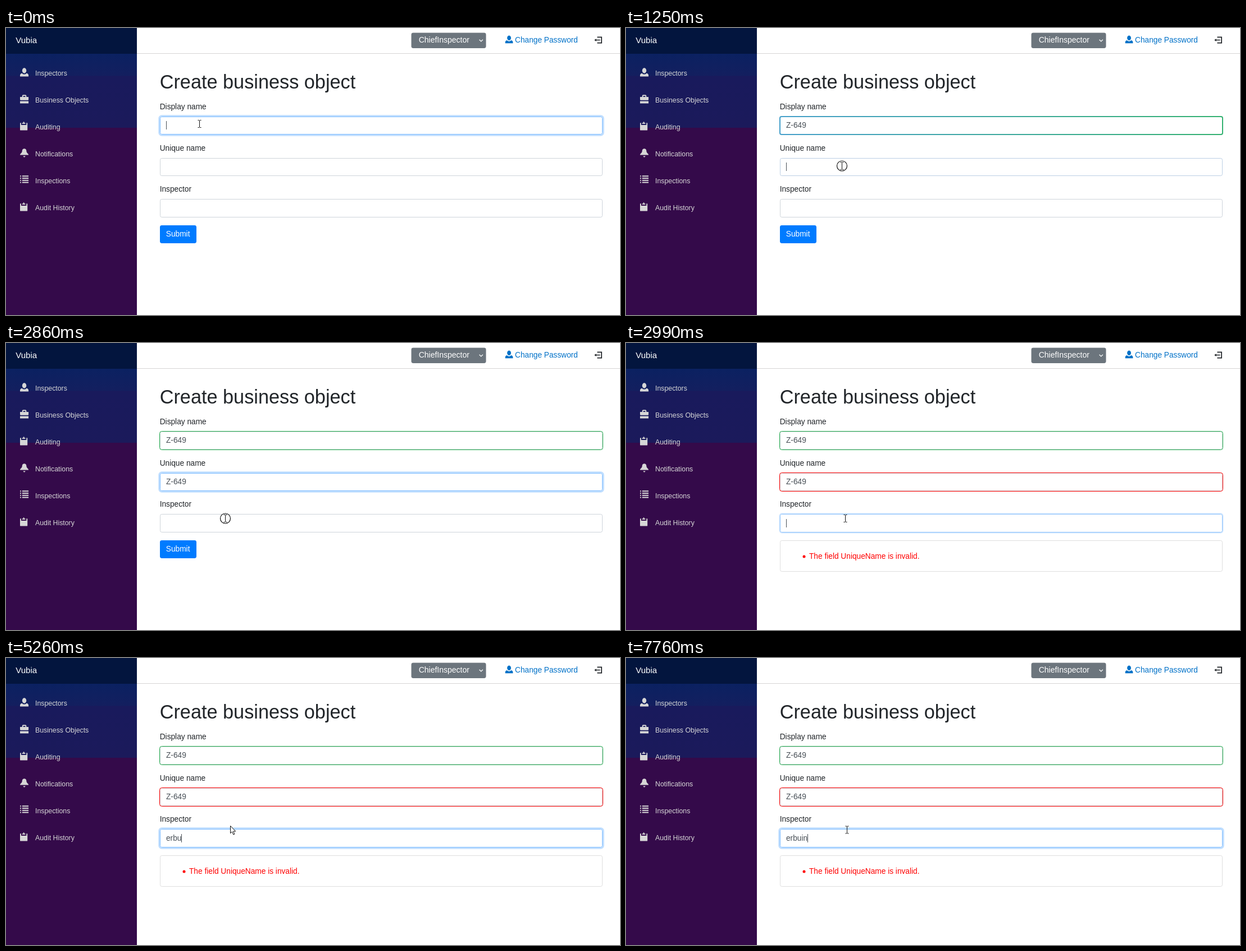
Recreate the animation shown at these times as an HTML page. Size 1093 px wide and 512 px high, loop 8 s.

```html
<!DOCTYPE html>
<html lang="en">
<head>
<meta charset="utf-8">
<title>Create business object</title>
<style>
html, body { margin: 0; width: 100%; height: 100%; overflow: hidden; background: #fff; }
#stage { position: relative; width: 1093px; height: 512px; overflow: hidden; }
#stage > * { position: absolute; }
.side {
  left: 0; top: 0; width: 233px; height: 512px;
  background: linear-gradient(#0b2161 46px, #131f5f 85px, #191a5c 86px, #1b1a5b 178px, #340a4a 178px);
}
.brand { left: 0; top: 0; width: 233px; height: 46px; background: #03153e; }
.bar { left: 233px; top: 45px; width: 860px; height: 1px; background: #d6d5d5; }
.field, .error { left: 274px; width: 788px; box-sizing: border-box; border: 1px solid #ced4da; border-radius: 3.4px; }
.error { top: 352px; height: 56px; border-color: #dfdfdf; }
.valid { outline: 1px solid #26b050; }
.invalid { outline: 1px solid #f00; }
.near { border-color: #bccfe4; }
.warm { border-color: #8fc3fb; box-shadow: 0 0 0 1.4px rgba(0, 123, 255, .2); }
.focus { border-color: #80bdff; box-shadow: 0 0 0 2.74px rgba(0, 123, 255, .25); }
.leaving::before, .leaving::after { content: ""; position: absolute; inset: -2px; border-radius: 4px; }
.leaving::before { background: linear-gradient(90deg, #459fca, #33b170); }
.leaving::after { inset: 0; background: #fff; border-radius: 2px; }
svg { left: 0; top: 0; }
text { font: 13.714px "Liberation Sans", Arial, sans-serif; fill: #212529; white-space: pre; }
.nav text { font-size: 12.343px; fill: #d7d7d7; }
.nav use { fill: #d7d7d7; }
.value { fill: #495057; }
.light { fill: #fff; }
.link { fill: #0071c8; }
</style>
</head>
<body>
<div id="stage">
  <div class="side"></div>
  <div class="brand"></div>
  <div class="bar"></div>
  <div class="field" style="top:158px;height:32px"></div>
  <div class="field" style="top:232px;height:32px"></div>
  <div class="field" style="top:305px;height:33px"></div>
  <div class="error" id="box"></div>
  <svg width="1093" height="512" viewBox="0 0 1093 512">
    <defs>
      <path id="person" d="M4 0c-1.1 0-2 1.12-2 2.5s.9 2.5 2 2.5 2-1.12 2-2.5-.9-2.5-2-2.5zm-2.09 5c-1.06.05-1.91.92-1.91 2v1h8v-1c0-1.08-.84-1.95-1.91-2-.54.61-1.28 1-2.09 1-.81 0-1.55-.39-2.09-1z"/>
      <path id="case" d="M3 0c-.55 0-1 .45-1 1v1h-2v2.5c0 .28.22.5.5.5h7c.28 0 .5-.22.5-.5v-2.5h-2v-1c0-.55-.45-1-1-1h-2zm0 1h2v1h-2zM0 5.91v2.09h8v-2.09c-.16.06-.32.09-.5.09h-7c-.18 0-.34-.04-.5-.09z"/>
      <path id="clip" d="M3.5 0c-.28 0-.5.22-.5.5v.5h-.75c-.14 0-.25.11-.25.25v.75h3v-.75c0-.14-.11-.25-.25-.25h-.75v-.5c0-.28-.22-.5-.5-.5zm-3.25 1c-.14 0-.25.11-.25.25v6.5c0 .14.11.25.25.25h6.5c.14 0 .25-.11.25-.25v-6.5c0-.14-.11-.25-.25-.25h-.75v2h-5v-2h-.75z"/>
      <path id="bell" d="M4 0c-1.1 0-2 .9-2 2 0 1.04-.52 1.98-1.34 2.66-.41.34-.66.82-.66 1.34h8c0-.52-.24-1-.66-1.34-.82-.68-1.34-1.62-1.34-2.66 0-1.1-.89-2-2-2zm-1 7c0 .55.45 1 1 1s1-.45 1-1h-2z"/>
      <path id="list" d="M0 0h1v1h-1zM2 0h6v1h-6zM0 2h1v1h-1zM2 2h6v1h-6zM0 4h1v1h-1zM2 4h6v1h-6zM0 6h1v1h-1zM2 6h6v1h-6z"/>
    </defs>

    <text class="light" x="17.2" y="27" style="font-size:15.086px">Vubia</text>
    <g class="nav" id="nav"></g>

    <rect x="721.5" y="8.5" width="133" height="27.5" rx="3.4" fill="#6c757d"/>
    <text class="light" x="734.7" y="26" style="font-size:14px">ChiefInspector</text>
    <path d="M842.6 20.8l3.1 3.1 3.1-3.1" fill="none" stroke="#fff" stroke-width="1.3"/>
    <use class="link" href="#person" transform="translate(888.7 13.5) scale(1.714)"/>
    <text class="link" x="906" y="26">Change Password</text>
    <path d="M3 0v1h4v5h-4v1h5v-7h-5zm-1 2l-2 1.5 2 1.5v-1h4v-1h-4v-1z" transform="translate(1047.3 15.5) scale(1.714)" fill="#212529"/>

    <text x="273.7" y="108" style="font-size:34.286px">Create business object</text>
    <text x="273.7" y="145">Display name</text>
    <text x="273.7" y="219">Unique name</text>
    <text x="273.7" y="292">Inspector</text>
    <text class="value" x="285" y="178"></text>
    <text class="value" x="285" y="252"></text>
    <text class="value" x="285" y="326"></text>

    <g id="submit">
      <rect x="274" y="352" width="65" height="32" rx="3.4" fill="#007bff"/>
      <text class="light" x="284.8" y="372">Submit</text>
    </g>
    <g id="message">
      <circle cx="317" cy="381" r="2.5" fill="#f00"/>
      <text x="326" y="385" style="fill:#f00">The field UniqueName is invalid.</text>
    </g>

    <rect id="caret" width="1" height="15" fill="#495057"/>
    <g id="pointer">
      <circle id="ring" r="9" fill="none" stroke="#111" stroke-width="1.2"/>
      <path id="beam" d="M-3 -6.5H-1L0 -5.8L1 -6.5H3M0 -6V6M-3 6.5H-1L0 5.8L1 6.5H3" fill="none" stroke="#111"/>
      <path id="arrow" d="M0 0V13.2L3 10.4L5.3 15.6L7.4 14.7L5.2 9.6H9.2Z" fill="#fff" stroke="#111"/>
    </g>
  </svg>
</div>
<script>
const $ = id => document.getElementById(id);
const fields = document.querySelectorAll('.field');
const values = document.querySelectorAll('.value');

const menu = [['person', 'Inspectors'], ['case', 'Business Objects'], ['clip', 'Auditing'],
  ['bell', 'Notifications'], ['list', 'Inspections'], ['clip', 'Audit History']];
$('nav').innerHTML = menu.map(([icon, label], i) => `
  <use href="#${icon}" transform="translate(25 ${71.3 + 48 * i}) scale(1.886)"/>
  <text x="52" y="${85 + 48 * i}">${label}</text>`).join('');

const item = 'Z-649', who = 'erbuin';
const beam = (x, y) => ({ shape: 'beam', x, y });
const arrow = (x, y) => ({ shape: 'arrow', x, y });

// Each step lists only what changes; caret is [field, x].
const steps = [
  [0, { text: ['', '', ''], look: ['focus', '', ''], caret: [0, 285], at: beam(344.5, 171), click: false, failed: false }],
  [300, { text: [item, '', ''], caret: null }],
  [430, { caret: [0, 320] }],
  [700, { at: arrow(368.5, 214.5) }],
  [830, { at: arrow(392.5, 270.5), caret: null }],
  [1100, { at: beam(384.5, 246) }],
  [1250, { look: ['leaving', 'near', ''], caret: [1, 285], click: true }],
  [1370, { look: ['valid', 'focus', ''], click: false, at: beam(385.5, 246) }],
  [1770, { caret: null }],
  [1920, { at: beam(386.5, 258) }],
  [2170, { text: [item, item, ''] }],
  [2320, { caret: [1, 320], at: arrow(387.5, 272.5) }],
  [2470, { at: arrow(389.5, 300.5) }],
  [2620, { at: beam(390.5, 313) }],
  [2860, { caret: null, click: true }],
  [2990, { look: ['valid', 'invalid', 'warm'], caret: [2, 285], click: false, failed: true }],
  [3140, { look: ['valid', 'invalid', 'focus'] }],
  [3410, { caret: null }],
  [4000, { caret: [2, 285], at: arrow(399.5, 299.5) }],
  [4560, { typed: 1, caret: null }],
  [4840, { typed: 2, caret: [2, 297] }],
  [5110, { typed: 3, caret: [2, 304] }],
  [5260, { typed: 4, caret: [2, 312] }],
  [5530, { typed: 5, caret: [2, 315] }],
  [5650, { typed: 6, caret: [2, 323] }],
  [6060, { caret: null }],
  [6460, { at: arrow(399.5, 298.5) }],
  [6610, { caret: [2, 323], at: arrow(399.5, 297.5) }],
  [6740, { at: arrow(398.5, 296.5) }],
  [6870, { at: arrow(398.5, 295.5) }],
  [7170, { caret: null, at: arrow(396.5, 299.5) }],
  [7300, { at: beam(393.5, 306.5) }],
  [7760, { caret: [2, 323] }]
];

let state = { typed: 0 };
const scenes = steps.map(([time, change]) => [time, state = { ...state, ...change }]);
const show = (id, on) => $(id).style.display = on ? '' : 'none';

function draw(s) {
  fields.forEach((el, i) => el.className = 'field ' + s.look[i]);
  values.forEach((el, i) => el.textContent = i < 2 ? s.text[i] : who.slice(0, s.typed));
  show('caret', s.caret);
  if (s.caret) {
    $('caret').setAttribute('x', s.caret[1]);
    $('caret').setAttribute('y', 166 + 74 * s.caret[0]);
  }
  show('beam', s.at.shape === 'beam');
  show('arrow', s.at.shape === 'arrow');
  show('ring', s.click);
  $('pointer').setAttribute('transform', `translate(${s.at.x} ${s.at.y})`);
  show('submit', !s.failed);
  show('box', s.failed);
  show('message', s.failed);
}

let shown;
function tick() {
  const t = performance.now() % 8000;
  const scene = scenes.findLast(([time]) => time <= t)[1];
  if (scene !== shown) draw(shown = scene);
  requestAnimationFrame(tick);
}
tick();
</script>
</body>
</html>
```
